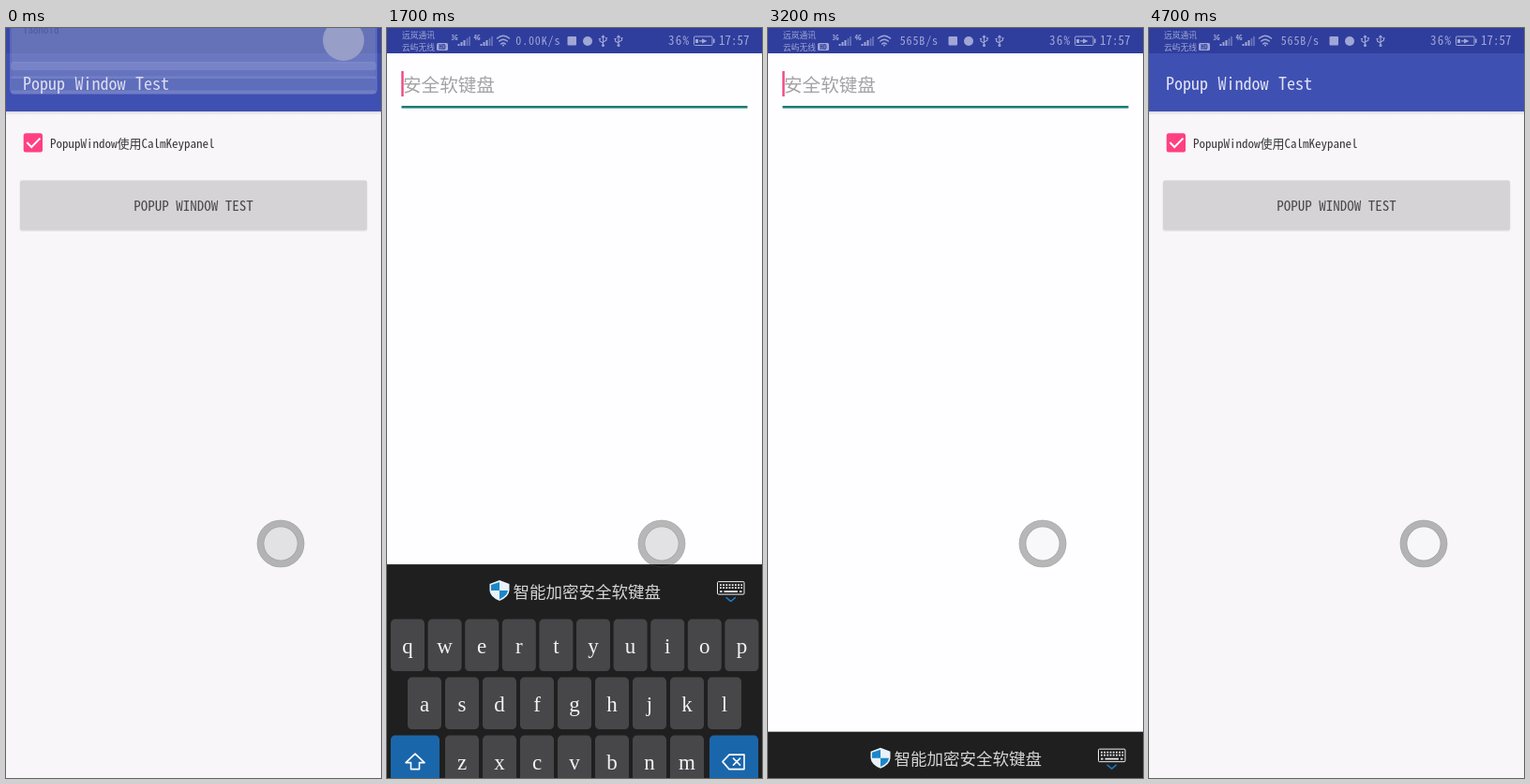
An HTML page for the animation above (4800 ms loop, 400 by 800 pixels).

```html
<!DOCTYPE html>
<html>
<head>
<meta charset="utf-8">
<title>Popup Window Test</title>
<style>
  html, body { margin: 0; width: 100%; height: 100%; overflow: hidden; background: #f8f6f9; }
  svg { display: block; width: 400px; height: 800px; }
  text { font-family: "Noto Sans Mono CJK SC", "Noto Sans CJK SC", "Noto Sans CJK", monospace; font-weight: 300; }
  .mid { text-anchor: middle; }
  .cjk { font-family: "Noto Sans CJK SC", "Noto Sans CJK", sans-serif; }
  .key { font: 23px "Liberation Serif", serif; fill: #f2f2f2; text-anchor: middle; }
  .line { fill: none; stroke-linecap: round; stroke-linejoin: round; }
</style>
</head>
<body>
<svg viewBox="0 0 400 800">
  <defs>
    <clipPath id="buttonClip"><rect x="15" y="162.5" width="370" height="53" rx="2"/></clipPath>
    <linearGradient id="drop" x2="0" y2="1">
      <stop stop-color="#000" stop-opacity=".12"/>
      <stop offset="1" stop-color="#000" stop-opacity="0"/>
    </linearGradient>
    <g id="bars">
      <path d="M1 10v-2M4 10V6M7 10V4" stroke-width="2"/>
      <path d="M10 10V2M12.5 10V0" stroke-width="1.6" opacity=".55"/>
    </g>
    <g id="usb" class="line" stroke-width="1.1">
      <path d="M5 1v10M1.5 4v2.5L5 8.5M8.5 3.5v2L5 7.5M3.6 2.4L5 .6l1.4 1.8"/>
      <circle cx="5" cy="11" r="1"/>
      <path d="M.8 4h1.4M7.8 3.2h1.4"/>
    </g>
  </defs>

  <rect width="400" height="800" fill="#f8f6f9"/>
  <rect y="89" width="400" height="4" fill="url(#drop)"/>
  <rect width="400" height="89" fill="#3f50b3"/>
  <text x="18" y="65.5" font-size="18" word-spacing="1.5" fill="#e0e3f3">Popup Window Test</text>

  <rect x="18.7" y="112.2" width="20.3" height="20.3" rx="2.5" fill="#ff4081"/>
  <path d="M22.3 122l4.9 5 9.2-9.4" fill="none" stroke="#fff" stroke-width="2"/>
  <text x="47" y="128" font-size="13" fill="#383838">PopupWindow使用CalmKeypanel</text>

  <rect x="14.5" y="163" width="371" height="54" rx="3" fill="#000" opacity=".08"/>
  <rect x="15" y="162.5" width="370" height="53" rx="2" fill="#d5d3d6"/>
  <g clip-path="url(#buttonClip)"><circle id="ripple" cx="198" cy="195" opacity=".125"/></g>
  <text class="mid" x="200" y="194.5" font-size="15" fill="#4a494b">POPUP WINDOW TEST</text>
  <g id="touch">
    <circle cx="191" cy="195" r="13" fill="#e4e4e6" opacity=".6"/>
    <circle cx="191" cy="195" r="12.5" fill="none" stroke="#999" opacity=".5"/>
  </g>

  <g id="popup">
    <rect y="27" width="400" height="773" fill="#fefdff"/>
    <text class="cjk" x="17" y="68" font-size="19.6" fill="#a3a3a3">安全软键盘</text>
    <rect x="15.5" y="83" width="369" height="2.6" fill="#1c7d75"/>
    <rect x="15.3" y="46" width="2.4" height="27" fill="#ec4a80"/>
    <g id="keyboard">
      <rect y="507" width="400" height="293" fill="#1f1f1f"/>
      <path d="M120 524l10.5 4v7q-.5 7-10.5 11-10-4-10.5-11v-7z" fill="#e9f2f8"/>
      <path d="M120 526v9h-9v-6zM120 535h9q-1 6-9 9.3z" fill="#1b87c9"/>
      <text class="cjk" x="134.5" y="542.5" font-size="17.5" fill="#d4d4d4">智能加密安全软键盘</text>
      <g stroke="#eee" fill="none">
        <rect x="352.5" y="525.5" width="28.5" height="13.5" rx="1"/>
        <path d="M355 529h24M355 532h24" stroke-width="1.8" stroke-dasharray="1.8 1.4"/>
        <path d="M355 536h2.5m2 0h14.5m2 0h2.5" stroke-width="1.8"/>
      </g>
      <path class="line" d="M362 542.5l4.7 4 4.7-4" stroke="#1f79c4" stroke-width="1.4"/>
      <g id="keys"></g>
      <g class="line" stroke="#fff" stroke-width="1.6">
        <path d="M30 709l10 9.5h-5.5v7h-9v-7H20z"/>
        <path d="M358 717.5l7-7.5h16v15.500h-16zM369.500 714l7 7m0-7l-7 7"/>
      </g>
    </g>
  </g>

  <rect width="400" height="27" fill="#2f3e9d"/>
  <g id="statusBar" fill="#a0a7d5">
    <text class="cjk" x="16" y="10.8" font-size="8.75">远岚通讯</text>
    <text class="cjk" x="16" y="23.5" font-size="8.75">云屿无线</text>
    <rect x="53" y="16" width="12" height="8" rx="1.5"/>
    <text class="mid" x="59" y="22.7" font-size="7.5" style="font-weight:700" fill="#2f3e9d">HD</text>
    <text x="68.5" y="12.5" font-size="7" style="font-weight:700">3G</text>
    <text x="92.5" y="12.5" font-size="7" style="font-weight:700">4G</text>
    <g stroke="#a0a7d5">
      <use href="#bars" x="75.5" y="9"/>
      <use href="#bars" x="99.5" y="9"/>
      <path class="line" d="M117.5 11q6.5-5.5 13 0M119.7 14q4.3-3.5 8.6 0M121.7 17q2.3-1.8 4.6 0" stroke-width="1.5"/>
      <use href="#usb" x="225.5" y="7.5"/>
      <use href="#usb" x="242" y="7.5"/>
      <rect x="327.5" y="9" width="19.5" height="9.5" rx="1" fill="none"/>
    </g>
    <circle cx="124" cy="18.5" r="1"/>
    <text id="speed" class="mid" x="161.3" y="18" font-size="12" letter-spacing=".85"></text>
    <rect x="192.5" y="9" width="9.5" height="9.5" rx="1"/>
    <circle cx="214" cy="14" r="5"/>
    <text x="300" y="18.3" font-size="13" letter-spacing="1.2">36%</text>
    <path d="M329 12h3v4h-3zM333 13.300h3v-2l5.500 2.600-5.500 2.600v-2h-3zM348 11.500h1.500v4.500H348z"/>
    <text x="354" y="18.3" font-size="13">17:57</text>
  </g>

  <g id="scrim">
    <rect width="400" height="27" fill="#3747a8"/>
    <g id="shade">
      <rect x="4" y="-30" width="392" height="100.5" rx="5" fill="#c9cadb" opacity=".23"/>
      <rect x="6" y="-30" width="388" height="82" rx="4" fill="#c9cadb" opacity=".06"/>
      <rect x="6" y="-30" width="388" height="68" rx="4" fill="#c9cadb" opacity=".06"/>
      <g fill="#d3d5ea" opacity=".16">
        <rect x="5" y="36" width="390" height="9" rx="3"/>
        <rect x="5" y="51.5" width="390" height="2.5"/>
        <rect x="5" y="66.5" width="390" height="4" rx="2"/>
      </g>
      <text x="18" y="6" font-size="11" fill="#4d58a0">Taonoid</text>
      <circle cx="360" cy="13" r="22" fill="#979ec8"/>
    </g>
  </g>

  <circle cx="293" cy="550" r="21.4" fill="none" stroke="#000" stroke-width="7.8" opacity=".28"/>
  <circle cx="293" cy="550" r="25" fill="none" stroke="#888" opacity=".2"/>
  <circle id="ball" cx="293" cy="550" r="17.5"/>
  <circle cx="293" cy="550" r="18" fill="none" stroke="#777" opacity=".25"/>
</svg>

<script>
const $ = id => document.getElementById(id);
const [ripple, touch, popup, keyboard, speed, statusIcons, scrim, shade, ball] =
  ['ripple', 'touch', 'popup', 'keyboard', 'speed', 'statusBar', 'scrim', 'shade', 'ball'].map($);

const GREY = '#474749', BLUE = '#1a66ab';
const key = (x, y, w, label = '', fill = GREY, style = '') =>
  `<rect x="${x}" y="${y}" width="${w}" height="55.5" rx="4.5" fill="${fill}"/>` +
  `<text class="key" x="${x + w / 2}" y="${y + 36}" style="${style}">${label}</text>`;
const row = (letters, x, y, pitch) =>
  [...letters].map((c, i) => key(x + i * pitch, y, 36, c)).join('');
const mono = size => `font:${size}px 'Noto Sans Mono CJK SC',monospace`;

$('keys').innerHTML =
  row('qwertyuiop', 4, 565.5, 39.6) +
  row('asdfghjkl', 22, 627.5, 40) +
  key(4, 689.5, 52, '', BLUE) + row('zxcvbnm', 62, 689.5, 40) + key(344, 689.5, 52, '', BLUE) +
  key(4, 752, 68, '123', BLUE, mono(14) + ';letter-spacing:.7px;translate:0 -3px') +
  key(76, 752, 48, ',') +
  key(128, 752, 145, 'space', GREY, mono(12) + ';translate:0 -4px') +
  key(277, 752, 48, '.') +
  key(329, 752, 68, '#+=', BLUE, mono(21) + ';letter-spacing:1.5px');

const LOOP = 4800, STEP = 100;
const ramp = (t, from, to) => Math.min(1, Math.max(0, (t - from) / (to - from)));
const ease = p => (1 - Math.cos(Math.PI * p)) / 2;

// Each pass: press, popup open, keyboard up, keyboard down, popup close.
const passes = [
  { press: 500, open: 1040, up: [1300, 1550], down: [1600, 1920], close: 2110 },
  { press: 2600, open: 3040, up: [3130, 3390], down: [3600, 3920], close: 4110 }
];

function draw(t) {
  const p = passes[t < 2500 ? 0 : 1];

  const held = t - p.press, pressed = held >= 0 && held < 200;
  ripple.setAttribute('r', pressed ? 60 + 1.16 * held : 0);
  touch.setAttribute('opacity', pressed ? 1 : 0);

  popup.setAttribute('opacity', ramp(t, p.open, p.open + 140) - ramp(t, p.close, p.close + 180));
  const shown = ease(ramp(t, ...p.up)) - ease(ramp(t, ...p.down));
  keyboard.setAttribute('transform', `translate(0 ${293 * (1 - shown)})`);

  const gone = ramp(t, 0, 400);
  shade.setAttribute('transform', `translate(0 ${-72 * gone})`);
  scrim.setAttribute('opacity', 1 - gone);
  statusIcons.setAttribute('opacity', gone);

  speed.textContent = t < 3100 ? '0.00K/s' : '565B/s';
  const dim = t < 2300;
  ball.setAttribute('fill', dim ? '#e2e1e4' : '#f8f7fa');
  ball.setAttribute('fill-opacity', dim ? 1 : .88);
}

const start = performance.now();
function tick() {
  const t = (performance.now() - start) % LOOP;
  draw(Math.floor(t / STEP) * STEP);
  requestAnimationFrame(tick);
}
tick();
</script>
</body>
</html>
```
